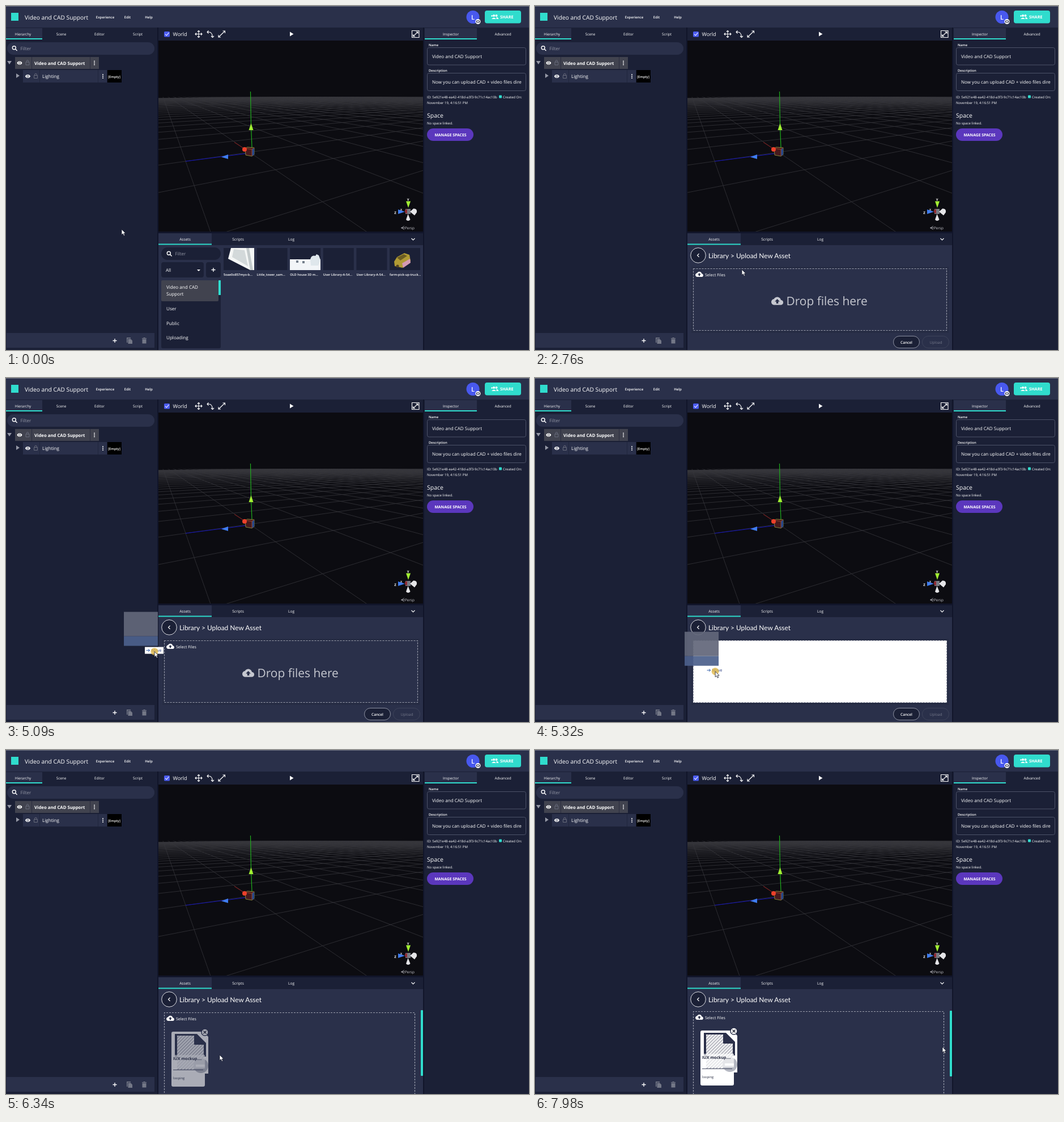
An HTML page that plays this animation: 923x607 px, repeating every 8 s.

```html
<!DOCTYPE html>
<html lang="en">
<head>
<meta charset="utf-8">
<title>Asset upload</title>
<style>
  html, body { margin: 0; width: 100%; height: 100%; overflow: hidden; background: #1b2036; }
  svg { display: block; width: 100vw; height: 100vh; font-family: "Open Sans", "Noto Sans", sans-serif; text-rendering: geometricPrecision; }
  text { fill: #fff; white-space: pre; }
  .mid { text-anchor: middle; }
  .semi { font-weight: 600; }
  .bold { font-weight: 700; }
  .mute { fill: #9497a5; }
  .dark { fill: #1b2036; }
  .panel { fill: #2a304a; }
  .picked { fill: #41434f; }
  .teal { fill: #30dccd; }
  .white { fill: #fff; }
  .line { fill: none; stroke: #fff; stroke-width: 1.1; }
  .dash { fill: none; stroke: #9a9dab; stroke-width: 1.2; stroke-dasharray: 3 2; }
</style>
</head>
<body>
<svg viewBox="0 0 923 607" preserveAspectRatio="none">
  <defs>
    <path id="cloud" d="M19.35 10.04C18.67 6.59 15.64 4 12 4 9.11 4 6.6 5.64 5.35 8.04 2.34 8.36 0 10.91 0 14c0 3.31 2.69 6 6 6h13c2.76 0 5-2.24 5-5 0-2.64-2.05-4.78-4.65-4.96zM14 13v4h-4v-4H7l5-5 5 5h-3z"/>
    <path id="eye" d="M12 4.5C7 4.5 2.73 7.61 1 12c1.73 4.39 6 7.5 11 7.5s9.27-3.11 11-7.5c-1.73-4.39-6-7.5-11-7.5zM12 17a5 5 0 1 1 0-10 5 5 0 0 1 0 10zm0-8a3 3 0 1 0 0 6 3 3 0 0 0 0-6z" transform="scale(.41) translate(-12 -12)"/>
    <path id="lock" d="M-3-1H3V4H-3ZM-1.8-1V-2.5A1.8 1.8 0 0 1 1.8-2.5V-1" fill="none" stroke="#686c7c"/>
    <g id="dots" class="white"><circle cy="-3" r="1"/><circle r="1"/><circle cy="3" r="1"/></g>
    <path id="search" class="line" d="M1.6 1.6 4.6 4.6M2.3-.7A3 3 0 1 1-3.7-.7 3 3 0 0 1 2.3-.7" style="stroke-width:1.4"/>
    <path id="plus" class="line" d="M-3.5 0H3.5M0-3.5V3.5" style="stroke-width:1.3"/>
    <pattern id="hatch" width="4" height="4" patternUnits="userSpaceOnUse" patternTransform="rotate(45)"><rect width="2.2" height="4" fill="#b9bac2"/></pattern>
    <clipPath id="view"><rect x="269" y="61" width="467" height="337"/></clipPath>
    <clipPath id="ground"><rect x="269" y="160.500" width="467" height="238"/></clipPath>
    <clipPath id="scroller"><rect x="270" y="458" width="466" height="149"/></clipPath>
    <clipPath id="field"><rect x="744" y="119" width="166" height="30"/></clipPath>
  </defs>

  <rect class="dark" width="923" height="607"/>

  <!-- header -->
  <rect class="panel" width="923" height="38"/>
  <rect width="923" height="1" fill="#6d7282"/>
  <rect class="teal" x="9" y="12" width="13" height="14"/>
  <text x="33" y="23.5" font-size="10.25">Video and CAD Support</text>
  <g class="semi mid" font-size="6.1"><text x="175" y="22">Experience</text><text x="214.500" y="22">Edit</text><text x="252" y="22">Help</text></g>
  <circle cx="824" cy="19.500" r="11.500" fill="#4858ee"/>
  <text class="mid semi" x="824" y="23.500" font-size="11">L</text>
  <circle cx="833" cy="27.500" r="4.500" class="white"/><path d="M830.500 26H835.500V29H830.500Z" fill="none" stroke="#1b2036"/>
  <rect class="teal" x="845" y="8" width="64" height="22.500" rx="4"/>
  <g class="white"><circle cx="861" cy="17" r="2"/><circle cx="865.500" cy="17" r="2"/><path d="M857 23Q861 18 865 23ZM865.500 23Q866 20 865 20Q868 19 869.500 23ZM856 17H859V18H856ZM857 16H858V19H857Z"/></g>
  <text class="bold" x="872" y="22" font-size="7.300">SHARE</text>

  <!-- hierarchy -->
  <rect class="panel" y="39" width="64" height="19"/><rect class="teal" y="57" width="64" height="2"/>
  <g class="mid" font-size="6.400"><text x="30" y="51.500">Hierarchy</text><text x="97.500" y="51.500">Scene</text><text x="165" y="51.500">Editor</text><text x="232.500" y="51.500">Script</text></g>
  <rect class="panel" x="2" y="64" width="260" height="22" rx="11"/>
  <use href="#search" x="15" y="74.500"/>
  <text class="mute" x="25.500" y="78" font-size="8">Filter</text>
  <path d="M2 97H10L6 103ZM18 119V127L24 123Z" fill="#9497a5"/>
  <rect class="picked" x="16" y="90" width="148" height="21"/>
  <rect class="panel" x="30" y="113" width="148" height="22"/>
  <path d="M45.500 90V111M148.500 90V111M59.500 113V135M162.500 113V135" stroke="#1b2036" stroke-opacity=".6"/>
  <use href="#eye" x="24" y="100.500" class="white"/><use href="#eye" x="38.500" y="124" class="white"/>
  <use href="#lock" x="38" y="100"/><use href="#lock" x="52.500" y="123.500"/>
  <use href="#dots" x="156" y="100.500"/><use href="#dots" x="171" y="124"/>
  <text class="bold" x="50" y="103.500" font-size="7.750">Video and CAD Support</text>
  <text x="64" y="127" font-size="8.100">Lighting</text>
  <rect x="179" y="113" width="25" height="22"/>
  <text class="mid semi" x="191" y="126.500" font-size="5.800">[Empty]</text>
  <rect class="panel" x="1" y="577" width="261" height="26"/>
  <use href="#plus" x="192" y="590.500"/>
  <g fill="#747887"><path d="M213 585H220V586.500H214.500V594H213ZM215.500 587.500H220L223 590.500V596H215.500ZM240.500 588H247.500V595.500H240.500ZM240 586H242.500V585H245.500V586H248V587.200H240Z"/></g>

  <!-- viewport -->
  <path d="M268 38V607M737 38V607" stroke="#11152a" stroke-width="2"/>
  <rect x="279" y="45" width="10" height="9.500" rx="1.500" fill="#4b5cf2"/>
  <path class="line" d="M281 49.500 283.300 52 287.500 47"/>
  <text x="294.500" y="52.500" font-size="9">World</text>
  <path class="line" d="M334.500 49.500H345.500M340 44V55M338 45.500 340 43.500 342 45.500M338 53.500 340 55.500 342 53.500M336 47.500 334 49.500 336 51.500M344 47.500 346 49.500 344 51.500M357.500 43.500 355 46 357.500 48.500M355 46H358Q364 46 364.500 55M362 53 364.500 55.500 367 53M375.500 54.500 386 44.500M382.500 44H386.500V48M375 51V55H379"/>
  <path class="white" d="M501 45.500 507.500 49.500 501 53.500Z"/>
  <path class="line" d="M716.500 43.500H729V55.500H716.500ZM719 53 726.500 46M723.500 45.500H727V49M718.500 50V53.500H722"/>
  <g clip-path="url(#view)">
    <rect x="269" y="61" width="467" height="337" fill="#0c0c11"/>
    <path id="grid" clip-path="url(#ground)" fill="none" stroke="#37373c" stroke-width=".75"/>
    <path d="M317 274 430 259.500" stroke="#1414bc"/>
    <path d="M403 240.500 430 258" stroke="#8c1b1b"/>
    <path d="M431.500 151 432.500 210 434 250" fill="none" stroke="#1fae1c" stroke-width="1.200"/>
    <path d="M432.500 207 436.500 219H428.500Z" fill="#a2f033"/>
    <path d="M380 266.500 392 262V270Z" fill="#3f7df0"/>
    <path d="M422 251 426 249 438 250V262L434 265 423 263Z" fill="#471a1d" stroke="#9da045" stroke-width=".8"/>
    <path d="M434 253 438 250V262L434 265Z" fill="#24468c"/>
    <path d="M422 251 434 253V265M434 253 438 250" fill="none" stroke="#a6542d" stroke-width=".8"/>
    <circle cx="421" cy="253" r="4" fill="#ec402a"/>
    <path d="M706 344.500H714L710 356Z" fill="#a2f033"/><path d="M692 359V367L704 363Z" fill="#3f7df0"/>
    <path d="M705 358H714V367H705Z" fill="#777a83"/><path d="M704 360 708 358V367L704 364Z" fill="#8f2c35"/>
    <path d="M713 363 719 357.500Q726 357 725 364L721 369.500ZM709.500 367 713.500 377Q709.500 381 706 377Z" fill="#e4e4e7"/>
    <g class="mid bold" font-size="6"><text x="709.500" y="343.500">Y</text><text x="687" y="366.500">Z</text><text x="697.500" y="361" font-size="4.500">X</text></g>
    <path d="M703 388.500 697.500 391.500 703 394.500M697.500 391.500H704" fill="none" stroke="#b9bac2" stroke-width=".8"/>
    <text x="704" y="394" font-size="6.400" style="fill:#c9cad0">Persp</text>
  </g>

  <!-- inspector -->
  <rect class="panel" x="739" y="39" width="92" height="19"/><rect class="teal" x="739" y="57" width="92" height="2"/>
  <g class="mid" font-size="6.400"><text x="785" y="51.500">Inspector</text><text x="877" y="51.500">Advanced</text></g>
  <g class="semi" font-size="5.900"><text x="746" y="70.500">Name</text><text x="746" y="115.500">Description</text></g>
  <g fill="none" stroke="#4c5268"><rect x="743.500" y="73.500" width="174" height="30.500" rx="3"/><rect x="743.500" y="118.500" width="174" height="31" rx="3"/></g>
  <g font-size="8.050"><text x="752" y="91.500">Video and CAD Support</text><text x="752" y="136.500" clip-path="url(#field)">Now you can upload CAD + video files directly</text></g>
  <g font-size="6"><text x="743" y="162.500">ID: 5e921e48-ea42-418d-a3f3-9c71c14ac10b</text><text x="877" y="162.500">Created On:</text><text x="743" y="173">November 19, 4:16:51 PM</text><text x="743" y="208.500">No space linked.</text></g>
  <rect class="teal" x="870" y="157.500" width="5" height="5" rx="1"/>
  <text x="743" y="197" font-size="10.500">Space</text>
  <rect x="743" y="216" width="82" height="22" rx="11" fill="#5b37bd"/>
  <text class="mid bold" x="784.500" y="229.700" font-size="6.850">MANAGE SPACES</text>

  <!-- bottom panel -->
  <rect x="269" y="398" width="467" height="3" fill="#11152a"/>
  <rect class="dark" x="269" y="401" width="467" height="21"/>
  <rect class="panel" x="269" y="422" width="467" height="185"/>
  <rect class="panel" x="269" y="401" width="94" height="20"/><rect class="teal" x="269" y="419.500" width="94" height="2"/>
  <g class="mid" font-size="6.600"><text x="316" y="414">Assets</text><text x="409.500" y="414">Scripts</text><text x="503.500" y="414">Log</text></g>
  <path class="line" d="M715.500 410 718.500 413 721.500 410"/>

  <g id="library">
    <rect class="dark" x="274" y="426" width="105" height="22" rx="11"/>
    <use href="#search" x="288" y="437"/><text class="mute" x="298.500" y="440" font-size="8">Filter</text>
    <rect class="dark" x="274" y="452" width="75" height="27" rx="4"/>
    <text x="282" y="468.500" font-size="8">All</text><path class="white" d="M337 465H343L340 468Z"/>
    <rect id="add" class="dark" x="353" y="452" width="26" height="27" rx="4"/><use href="#plus" x="366" y="465.500"/>
    <rect class="dark" x="274" y="484" width="105" height="120" rx="3"/>
    <rect class="picked" x="274" y="484" width="101" height="37" rx="2"/><rect class="teal" x="375" y="484" width="4" height="26"/>
    <g font-size="8.100"><text x="283" y="499">Video and CAD</text><text x="283" y="511">Support</text><text x="283" y="537">User</text><text x="283" y="562.500">Public</text><text x="283" y="588">Uploading</text></g>
    <g id="thumbs" class="semi" font-size="5.600"></g>
    <path d="M397 427H438V466H431L392 446Z" fill="#f4f6f5"/><path d="M402 429 421 431 427 459 399 443Z" fill="#d3d9da"/><path d="M424 427H429L436 466H431Z" fill="#c3cacb"/>
    <path d="M501 447H555V466H501Z" fill="#f2f5f8"/><path d="M537 447Q539 439 546 441L548 438 552 440 555 448 551 458H538Z" fill="#dfe7ec"/><path d="M512 449H516V453H512ZM523 450H527V454H523Z" fill="#75808d"/>
    <path d="M685 451 690 443 703 436 712 439 714 450 700 462 686 459Z" fill="#b09a34"/><path d="M690 444 702 438 708 441 696 449Z" fill="#6b5c22"/><path d="M699 454 713 446 714 453 701 462Z" fill="#d59ab2"/><circle cx="691" cy="459" r="2.500" fill="#514020"/>
  </g>

  <g id="upload">
    <circle class="dark" cx="288" cy="440" r="13.300" stroke="#dcdde3"/>
    <path class="line" d="M289.500 437 286.500 440 289.500 443"/>
    <text x="306" y="444.500" font-size="11.900" style="font-family:Lato,sans-serif">Library &gt; Upload New Asset</text>
    <g id="dropView">
      <rect x="276" y="460" width="454" height="117" fill="#262c44"/>
      <rect class="panel" x="279" y="463" width="448" height="110"/>
      <g id="dropHint">
        <use href="#cloud" transform="translate(283 466.500) scale(.58)" class="white"/><text x="300" y="476.500" font-size="7.050">Select Files</text>
        <use href="#cloud" transform="translate(417 510) scale(.88)" fill="#c6c8d0"/><text x="443.500" y="527.500" font-size="20.900" style="fill:#c6c8d0">Drop files here</text>
      </g>
      <rect id="dropWhite" class="white" x="279" y="463" width="448" height="110"/>
      <rect class="dash" x="279.500" y="463.500" width="447" height="109"/>
      <rect class="dark" x="632.500" y="582.500" width="46" height="21" rx="10.500" stroke="#8b8fa0"/>
      <rect x="683.500" y="582.500" width="47" height="21" rx="10.500" fill="none" stroke="#3d435a"/>
      <g class="mid" font-size="6.500"><text class="semi" x="655.500" y="595.500">Cancel</text><text x="707.500" y="595.500" style="fill:#777b8c">Upload</text></g>
    </g>
    <g id="listView" clip-path="url(#scroller)">
      <rect class="panel" x="270" y="458" width="466" height="149"/>
      <g id="list">
        <path class="dash" d="M279.500 640V463.500H721.500V640"/>
        <use href="#cloud" transform="translate(283 466.500) scale(.58)" class="white"/><text x="300" y="476.500" font-size="7.050">Select Files</text>
        <g id="card">
          <path class="white" d="M295 497H348L357 506V571H351V591Q351 594 348 594H295Q292 594 292 591V500Q292 497 295 497Z"/>
          <path d="M298 501H337L353 517V541H298Z" fill="#2b304a"/>
          <path d="M302 504H332V520H349V565H302Z" class="white"/><path d="M302 504H332V520H349V565H302Z" fill="url(#hatch)"/>
          <circle cx="344" cy="557" r="13" fill="#b4b7c1"/><path d="M335 557H351" stroke="#fff" stroke-width="4"/>
          <path d="M292 538H351V562H292Z" class="white" opacity=".65"/>
          <path d="M295 564.500H348" stroke="#4d5268"/>
          <g style="--ink:#22273d"><text class="bold" x="295" y="547" font-size="7.050" style="fill:var(--ink)">IUX mockup....</text><text x="295" y="581" font-size="5.800" style="fill:var(--ink)">looping</text></g>
          <circle cx="351" cy="498" r="6" class="white" stroke="#2a304a" stroke-width="1.500"/><path d="M348.500 495.500 353.500 500.500M353.500 495.500 348.500 500.500" stroke="#14182a" stroke-width="1.300"/>
        </g>
      </g>
      <rect id="thumb" class="teal" x="732" y="459" width="4" height="116" rx="1"/>
    </g>
  </g>

  <g id="pointer">
    <g id="drag">
      <g opacity=".92"><rect x="-54" y="-70" width="60" height="43" fill="#62677a"/><rect x="-54" y="-27" width="60" height="17" fill="#4c608c"/></g>
      <rect class="white" x="-17" y="-8" width="33" height="12"/>
      <path d="M-14.500-2H-8.500M-11-4.500-8.500-2-11 .5" fill="none" stroke="#2c5aa8"/>
      <text x="-5.500" y=".500" font-size="7" style="fill:#2b3f86">Move</text>
    </g>
    <circle id="press" r="6.500" fill="#e0b53f" opacity=".75"/>
    <path id="arrow" d="M0 0V9.800L2.300 7.700 4 11.400 5.700 10.600 4.100 7.100H7.100Z" class="white" stroke="#15182a" stroke-width=".8"/>
    <path id="hand" d="M-1.500 0Q0-1.500 1.200 0V4L5.500 5.200Q6.500 5.600 6.200 7.500L5 12.500H-.8L-4 8Q-3.500 6.300-1.500 8Z" class="white" stroke="#15182a" stroke-width=".8"/>
  </g>
</svg>
<script>
const LOOP = 8000;
const el = id => document.getElementById(id);
const show = (id, on) => el(id).style.display = on ? "" : "none";

// Ground plane in perspective: origin plus the vanishing points of both axes.
const origin = [430, 258];
const axisZ = { to: [1179, 152], w: 0.1311 }, axisX = { to: [274, 152], w: 0.226 };
const CELLS = 40, FAR = 90;
function project(z, x) {
  const wz = z * axisZ.w, wx = x * axisX.w;
  return [0, 1].map(i => ((origin[i] + wz * axisZ.to[i] + wx * axisX.to[i]) / (1 + wz + wx)).toFixed(1));
}
let gridPath = "";
for (let k = -CELLS; k <= CELLS; k++) {
  const nearX = (-0.9 - k * axisZ.w) / axisX.w, nearZ = (-0.9 - k * axisX.w) / axisZ.w;
  gridPath += `M${project(k, nearX)}L${project(k, FAR)}`;
  gridPath += `M${project(nearZ, k)}L${project(FAR, k)}`;
}
el("grid").setAttribute("d", gridPath);

const assets = ["5oae0o857myo-b...", "Little_tower_sam...", "OLD house 3D m...", "User Library-A-54...", "User Library-A-54...", "farm-pick-up-truck..."];
el("thumbs").innerHTML = assets.map((name, i) => {
  const x = 384 + 58.6 * i;
  return `<rect class="dark" x="${x}" y="427" width="54" height="39"/><text x="${x}" y="475.500">${name}</text>`;
}).join("");

// Screen-capture progress: n equal jumps, the first at start, the last at end.
function steps(t, start, end, n) {
  if (t < start) return 0;
  return Math.min(1, (Math.floor((t - start) / (end - start) * (n - 1) + 1e-6) + 1) / n);
}

const moves = [
  { start: 1090, end: 1890, n: 11, from: [204, 394], to: [365, 465] },
  { start: 3230, end: 3540, n: 5, from: [365, 465], to: [62, 311] },
  { start: 4620, end: 5400, n: 11, from: [-30, 290], via: [258, 484], to: [362, 544] },
  { start: 5480, end: 5640, n: 3, from: [362, 544], to: [377, 538] },
  { start: 6650, end: 7360, n: 10, from: [377, 538], to: [750, 514] },
  { start: 7590, end: 7980, n: 6, from: [750, 514], to: [719, 524] },
];
function pointerAt(t) {
  const { start, end, n, from, via, to } = moves.findLast(m => t >= m.start) || moves[0];
  const p = steps(t, start, end, n), q = 1 - p, e = p * p * (3 - 2 * p);
  return from.map((a, i) => via ? q * q * a + 2 * p * q * via[i] + p * p * to[i] : a + (to[i] - a) * e);
}

function draw(t) {
  const [x, y] = pointerAt(t);
  const onAdd = t < 2510 && x > 353 && y > 452;
  const dragging = t >= 4620 && t < 5640;
  const listed = t >= 6020;
  const hovering = t >= 4620 && x >= 279 && !listed;

  el("pointer").setAttribute("transform", `translate(${x} ${y})`);
  show("pointer", t < 3610 || t >= 4620);
  show("hand", onAdd);
  show("arrow", !onAdd);
  show("drag", dragging);
  show("press", dragging || (t >= 2360 && t < 2510));

  el("add").setAttribute("class", onAdd ? "picked" : "dark");
  show("library", t < 2510);
  show("upload", t >= 2510);
  show("dropView", !listed);
  show("dropHint", !hovering);
  show("dropWhite", hovering);
  show("listView", listed);

  el("card").style.opacity = steps(t, 6180, 6500, 5);
  const scroll = 2 * steps(t, 7590, 7980, 6);
  el("list").setAttribute("transform", `translate(0 ${-scroll})`);
  el("thumb").setAttribute("y", 459 + scroll / 2);
}

const began = performance.now();
function tick() {
  draw((performance.now() - began) % LOOP);
  requestAnimationFrame(tick);
}
tick();
</script>
</body>
</html>
```
